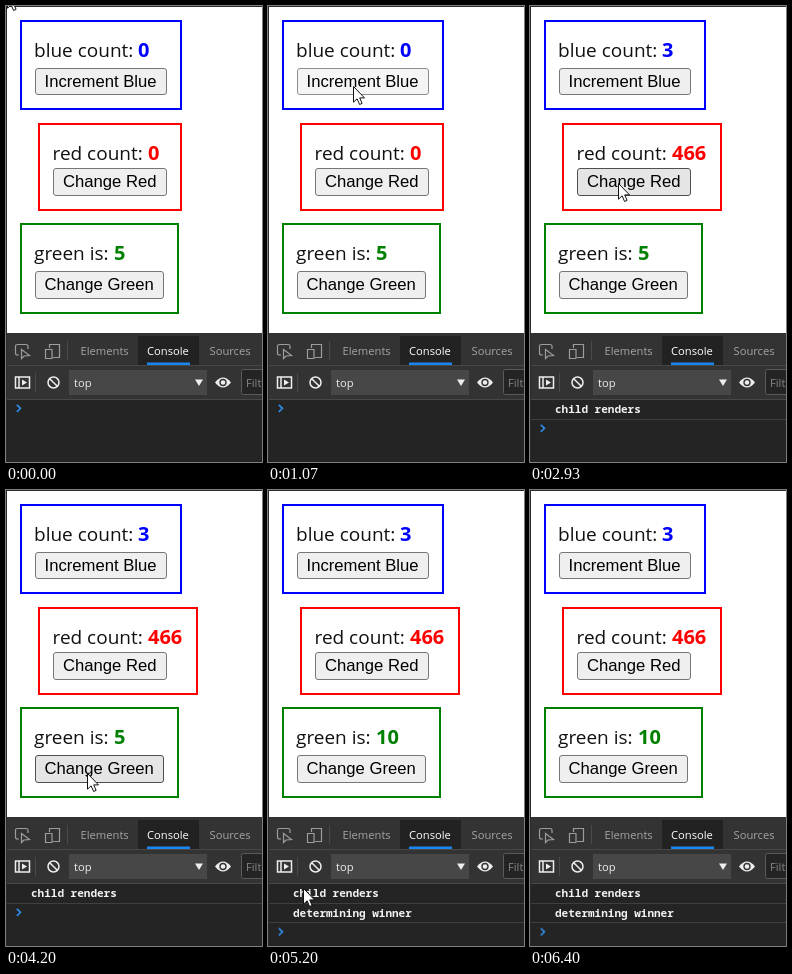
An HTML page that plays this animation: 256x456 px, repeating every 6470 ms.

```html
<!DOCTYPE html>
<html lang="en">
<head>
<meta charset="utf-8">
<title>Counter demo</title>
<style>
html, body { margin: 0; width: 100%; height: 100%; overflow: hidden; background: #fff; }
svg { display: block; }
text { white-space: pre; }

.label { font: 19px "Open Sans", "Noto Sans", sans-serif; fill: #111; }
.value { font: 700 20px "Open Sans", "Noto Sans", sans-serif; }
.caption { font: 16.667px "Liberation Sans", Arial, sans-serif; fill: #000; }
.ui { font: 11.2px "Open Sans", "Noto Sans", sans-serif; fill: #a2a5a8; }
.log { font: 600 11px "Noto Sans Mono", "DejaVu Sans Mono", monospace; fill: #f2f2f2; }
.frame { fill: none; stroke-width: 2; }
.btn { fill: #efefef; stroke: #767676; }
.icon { fill: none; stroke: #9a9da0; stroke-width: 1.2; }
.lit { stroke: #eee; stroke-width: 1.5; }
.chevron { fill: none; stroke: #2f8ce6; stroke-width: 1.6; }

/* every part shares one 6470 ms loop */
.anim { animation: 6470ms step-end infinite; }
#cursor { animation-name: travel; }
#blueBtn { animation-name: blueBtn; }
#redBtn { animation-name: redBtn; }
#greenBtn { animation-name: greenBtn; }
#blue0 { animation-name: blue0; }
#blue1 { animation-name: blue1; }
#blue2 { animation-name: blue2; }
#blue3 { animation-name: blue3; }
.redBefore { animation-name: redBefore; }
.redAfter { animation-name: redAfter; }
.greenBefore { animation-name: greenBefore; }
.greenAfter { animation-name: greenAfter; }
#prompt { animation-name: prompt; }

@keyframes blue0 { 0% { opacity: 1 } 17.46%, 100% { opacity: 0 } }
@keyframes blue1 { 0% { opacity: 0 } 17.46% { opacity: 1 } 21.63%, 100% { opacity: 0 } }
@keyframes blue2 { 0% { opacity: 0 } 21.63% { opacity: 1 } 26.73%, 100% { opacity: 0 } }
@keyframes blue3 { 0% { opacity: 0 } 26.73%, 100% { opacity: 1 } }
@keyframes redBefore { 0% { opacity: 1 } 45.28%, 100% { opacity: 0 } }
@keyframes redAfter { 0% { opacity: 0 } 45.28%, 100% { opacity: 1 } }
@keyframes greenBefore { 0% { opacity: 1 } 68%, 100% { opacity: 0 } }
@keyframes greenAfter { 0% { opacity: 0 } 68%, 100% { opacity: 1 } }
@keyframes prompt {
  0% { transform: none }
  45.28% { transform: translateY(20px) }
  68%, 100% { transform: translateY(39.5px) }
}

/* hover is darker, pressed is lighter */
@keyframes blueBtn {
  0%, 34%, 100% { fill: #efefef; stroke: #767676 }
  7.2%, 17.46%, 21.63%, 26.73% { fill: #e5e5e5; stroke: #4f4f4f }
  16.53%, 19.62%, 25.81% { fill: #f5f5f5; stroke: #8d8d8d }
}
@keyframes redBtn {
  0%, 54.55%, 100% { fill: #efefef; stroke: #767676 }
  38.17%, 45.28% { fill: #e5e5e5; stroke: #4f4f4f }
  44.35% { fill: #f5f5f5; stroke: #8d8d8d }
}
@keyframes greenBtn {
  0%, 75.19%, 100% { fill: #efefef; stroke: #767676 }
  58.7%, 68% { fill: #e5e5e5; stroke: #4f4f4f }
  66.92% { fill: #f5f5f5; stroke: #8d8d8d }
}

/* the pointer advances about every 67 ms while it moves */
@keyframes travel {
  0% { transform: translate(1px, -14px) }
  2% { transform: translate(1px, -14px); animation-timing-function: steps(4, start) }
  6.16% { transform: translate(46px, 50px); animation-timing-function: steps(5, start) }
  11.28% { transform: translate(81px, 84px) }
  12.36% { transform: translate(81px, 84px); animation-timing-function: steps(4, start) }
  16.48%, 32.9% { transform: translate(85px, 80px) }
  32.91% { transform: translate(85px, 80px); animation-timing-function: steps(2, start) }
  35% { transform: translate(85px, 92px); animation-timing-function: steps(4, start) }
  39.1% { transform: translate(87px, 168px); animation-timing-function: steps(2, start) }
  41.2% { transform: translate(88px, 177px) }
  54.55% { transform: translate(88px, 177px); animation-timing-function: steps(2, start) }
  56.65% { transform: translate(87px, 215px); animation-timing-function: steps(3, start) }
  59.75% { transform: translate(83px, 272px); animation-timing-function: steps(1, start) }
  60.8% { transform: translate(82px, 284px) }
  64.9% { transform: translate(81px, 283px) }
  75.19% { transform: translate(81px, 283px); animation-timing-function: steps(6, start) }
  81.37% { transform: translate(35px, 398px); animation-timing-function: steps(4, start) }
  85.4% { transform: translate(57px, 431px) }
  85.47% { transform: translate(57px, 431px); animation-timing-function: steps(3, start) }
  88.5% { transform: translate(78px, 417px); animation-timing-function: steps(3, start) }
  91.6% { transform: translate(94px, 428px) }
  92.7% { transform: translate(94px, 428px); animation-timing-function: steps(3, start) }
  95.8%, 100% { transform: translate(92px, 458px) }
}
</style>
</head>
<body>
<svg width="256" height="456" viewBox="0 0 256 456">
  <rect width="256" height="456" fill="#fff"/>

  <!-- blue card -->
  <rect class="frame" x="15" y="15" width="160" height="88" stroke="#00f"/>
  <text class="label" x="28" y="51">blue count:</text>
  <g class="value" fill="#00f">
    <text id="blue0" class="anim" x="132" y="51">0</text>
    <text id="blue1" class="anim" x="132" y="51" opacity="0">1</text>
    <text id="blue2" class="anim" x="132" y="51" opacity="0">2</text>
    <text id="blue3" class="anim" x="132" y="51" opacity="0">3</text>
  </g>
  <rect id="blueBtn" class="btn anim" x="29.5" y="62.5" width="131" height="26" rx="2.5"/>
  <text class="caption" x="38.5" y="81">Increment Blue</text>

  <!-- red card -->
  <g class="redBefore anim">
    <rect class="frame" x="33" y="118" width="142" height="86" stroke="#f00"/>
    <text class="value" x="142" y="154" fill="#f00">0</text>
  </g>
  <g class="redAfter anim" opacity="0">
    <rect class="frame" x="33" y="118" width="158" height="86" stroke="#f00"/>
    <text class="value" x="142" y="154" fill="#f00">466</text>
  </g>
  <text class="label" x="46.5" y="154">red count:</text>
  <rect id="redBtn" class="btn anim" x="47.5" y="162.5" width="113" height="27" rx="2.5"/>
  <text class="caption" x="57" y="181">Change Red</text>

  <!-- green card -->
  <rect class="frame" x="15" y="218" width="157" height="89" stroke="#008000"/>
  <text class="label" x="28" y="254">green is:</text>
  <g class="value" fill="#008000">
    <text class="greenBefore anim" x="108" y="254">5</text>
    <text class="greenAfter anim" x="108" y="254" opacity="0">10</text>
  </g>
  <rect id="greenBtn" class="btn anim" x="29.5" y="265.5" width="128" height="27" rx="2.5"/>
  <text class="caption" x="38.5" y="284">Change Green</text>

  <!-- tab bar -->
  <rect y="327" width="256" height="129" fill="#242424"/>
  <rect y="327" width="256" height="32" fill="#333"/>
  <rect x="132" y="330" width="61" height="29" fill="#222"/>
  <rect x="141" y="356.5" width="43" height="2.5" fill="#1a86f0"/>
  <path class="icon" d="M13 349H11.500Q9.500 349 9.500 347V340Q9.500 338.500 11.500 338.500H20Q22 338.500 22 340V343"/>
  <path class="icon" d="M15.500 343.500V352.500L18 350L23.500 349.500Z"/>
  <path class="icon" d="M43.500 342V338.500H53.500V351.500H47M39.500 343.500H46V352.500H39.500Z"/>
  <rect x="61" y="335" width="1" height="19" fill="#4a4a4a"/>
  <text class="ui" x="74.500" y="349">Elements</text>
  <text class="ui" x="141" y="349" style="fill:#fff">Console</text>
  <text class="ui" x="203.500" y="349">Sources</text>

  <!-- console toolbar -->
  <rect y="359" width="256" height="35" fill="#333"/>
  <rect y="359" width="256" height="1" fill="#484848"/>
  <rect y="393" width="256" height="1" fill="#484848"/>
  <path class="icon lit" d="M9.500 371H23.500V382H9.500ZM13 371V382"/>
  <path d="M16 373.500L21 376.500L16 379.500Z" fill="#eee"/>
  <rect x="29" y="367" width="1" height="19" fill="#4a4a4a"/>
  <circle class="icon lit" cx="47.500" cy="376.500" r="5.500"/>
  <path class="icon lit" d="M43.700 372.700L51.300 380.300"/>
  <rect x="63" y="364" width="138" height="25" fill="#474747"/>
  <text class="ui" x="68" y="381" style="fill:#eee">top</text>
  <path d="M189 373.500H197L193 380Z" fill="#eee"/>
  <path d="M209 376.500Q217 366.500 225 376.500Q217 386.500 209 376.500Z" fill="#eee"/>
  <circle cx="217" cy="376.500" r="3" fill="#eee" stroke="#333" stroke-width="1.400"/>
  <rect x="235.500" y="363.500" width="30" height="25" rx="2" fill="#242424" stroke="#5a5a5a"/>
  <text class="ui" x="240" y="381" style="fill:#858585">Filter</text>

  <!-- console output -->
  <g class="redAfter anim" opacity="0">
    <text class="log" x="25" y="407">child renders</text>
    <rect x="1" y="413" width="255" height="1" fill="#3f3f3f"/>
  </g>
  <g class="greenAfter anim" opacity="0">
    <text class="log" x="25" y="427">determining winner</text>
    <rect x="1" y="432" width="255" height="1" fill="#3f3f3f"/>
  </g>
  <g id="prompt" class="anim">
    <path class="chevron" d="M10.800 398.800L14.500 402.300L10.800 405.800"/>
  </g>

  <path d="M0 0H256V1H1V456H0Z" fill="#2a2a2a"/>

  <g id="cursor" class="anim">
    <path d="M.500 .500V16.200L4.100 12.800L6.600 18.500L9.100 17.400L6.700 11.900H11.500Z" fill="#fff" stroke="#111"/>
  </g>
</svg>
</body>
</html>
```
